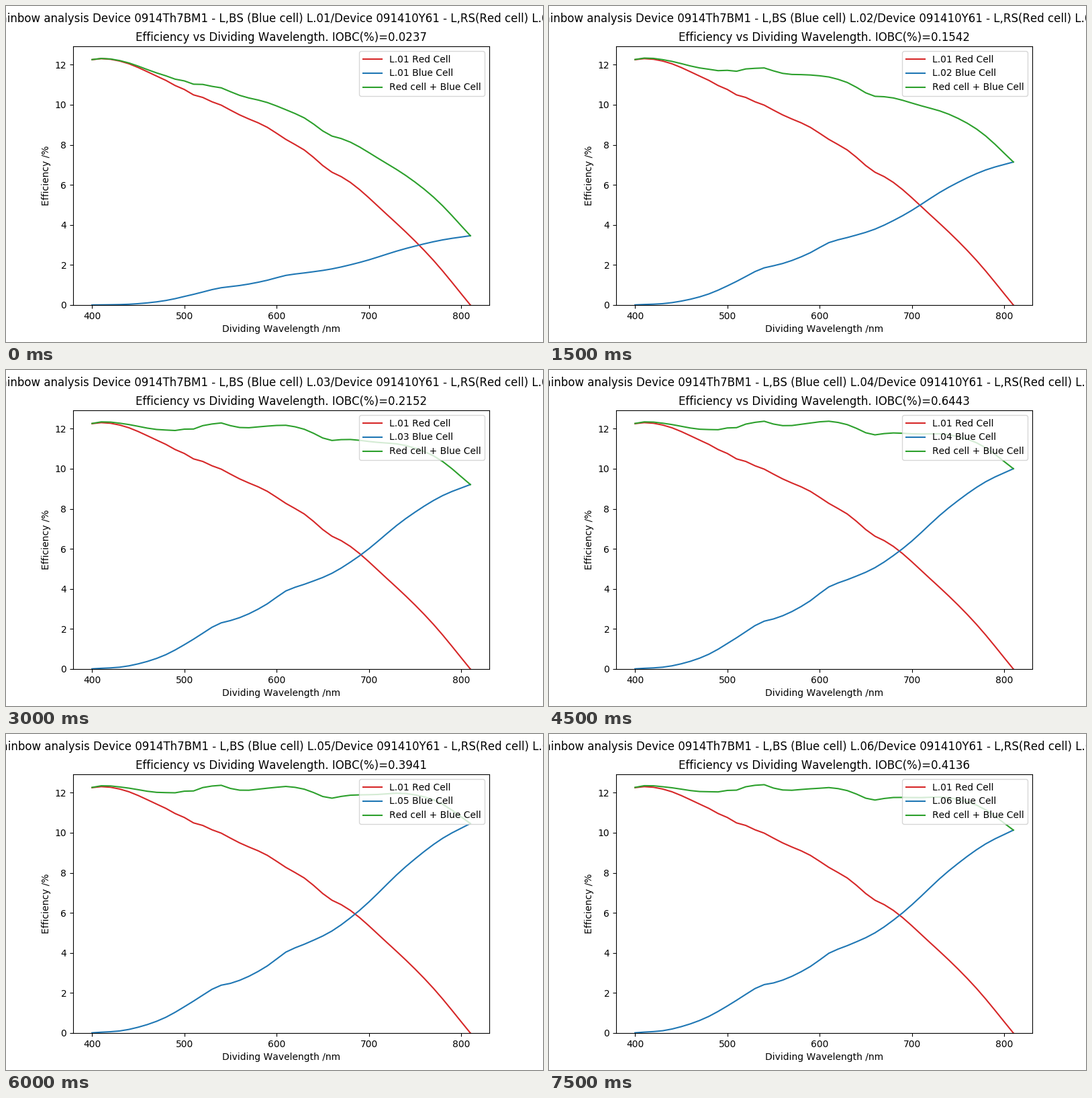
Write a matplotlib script that moves like this. It is 800 by 500 pixels and loops after 8000 ms.

```python
import numpy as np
import matplotlib.pyplot as plt
from matplotlib.animation import FuncAnimation

STEP_MS = 500
HOLD = 3          # steps each cell pair stays on screen
STEPS = 16

plt.rcParams["text.kerning_factor"] = 6   # loose letter spacing

wave = np.arange(400, 811, 10)


def smooth(*keys):
    """Cubic Hermite curve through (wavelength, efficiency) keys."""
    x, y = np.array(keys, float).T
    slope = np.gradient(y, x)
    i = np.clip(np.searchsorted(x, wave, "right") - 1, 0, len(x) - 2)
    h = x[i + 1] - x[i]
    t = (wave - x[i]) / h
    return ((1 + 2 * t) * (1 - t) ** 2 * y[i] + t * (1 - t) ** 2 * h * slope[i]
            + t * t * (3 - 2 * t) * y[i + 1] + t * t * (t - 1) * h * slope[i + 1])


# The red cell falls smoothly, with a fine zigzag around 512 nm.
zigzag = 0.03 * (-1.0) ** (wave // 10) * np.exp(-((wave - 512) / 25) ** 2)
red = zigzag + smooth(
    (400, 12.25), (410, 12.30), (430, 12.18), (470, 11.43), (510, 10.52),
    (540, 9.97), (560, 9.49), (590, 8.87), (610, 8.27), (630, 7.74),
    (660, 6.63), (670, 6.41), (720, 4.50), (770, 2.23), (810, 0))

# All blue cells share one shape; each scales it by a slowly varying gain.
blue = smooth(
    (400, 0.01), (440, 0.16), (480, 0.74), (510, 1.56), (540, 2.39),
    (550, 2.50), (590, 3.41), (610, 4.10), (630, 4.46), (660, 5.06),
    (690, 6.01), (740, 8.05), (780, 9.35), (810, 10.0))
gain_at = [440, 500, 550, 600, 700, 810]
cells = [   # IOBC, gains
    (0.0237, [0.25, 0.336, 0.368, 0.362, 0.353, 0.346]),
    (0.1542, [0.75, 0.75, 0.784, 0.762, 0.74, 0.714]),
    (0.2152, [1, 0.953, 0.968, 0.952, 0.94, 0.921]),
    (0.6443, [1, 1, 1, 1, 1, 1]),
    (0.3941, [1.13, 1.03, 0.992, 0.981, 1.024, 1.046]),
    (0.4136, [1.25, 1.06, 1, 0.968, 1.002, 1.013]),
]

fig, ax = plt.subplots(figsize=(8, 5), dpi=100)
ax.plot(wave, red, color="tab:red", label="L.01 Red Cell")
blue_line, = ax.plot(wave, blue, color="tab:blue", label="L.01 Blue Cell")
sum_line, = ax.plot(wave, red + blue, color="tab:green",
                    label="Red cell + Blue Cell")
ax.set_xlim(379.5, 830.5)
ax.set_ylim(0, 12.30 * 1.05)
ax.set_xlabel("Dividing Wavelength /nm")
ax.set_ylabel("Efficiency /%")
title = ax.set_title("")
heading = fig.suptitle("")
blue_label = ax.legend(loc="upper right").get_texts()[1]


def update(step):
    i = step // HOLD
    iobc, gains = cells[i]
    name = f"L.{i + 1:02d}"
    y = blue * np.interp(wave, gain_at, gains)
    blue_line.set_ydata(y)
    sum_line.set_ydata(red + y)
    blue_label.set_text(f"{name} Blue Cell")
    title.set_text(f"Efficiency vs Dividing Wavelength. IOBC(%)={iobc:.4f}")
    heading.set_text("Rainbow analysis Device 0914Th7BM1 - L,BS (Blue cell) "
                     f"{name}/Device 091410Y61 - L,RS(Red cell) L.01")
    return blue_line, sum_line, blue_label, title, heading


anim = FuncAnimation(fig, update, frames=STEPS, init_func=lambda: update(0),
                     interval=STEP_MS, repeat=True, repeat_delay=0)
plt.show()
```
